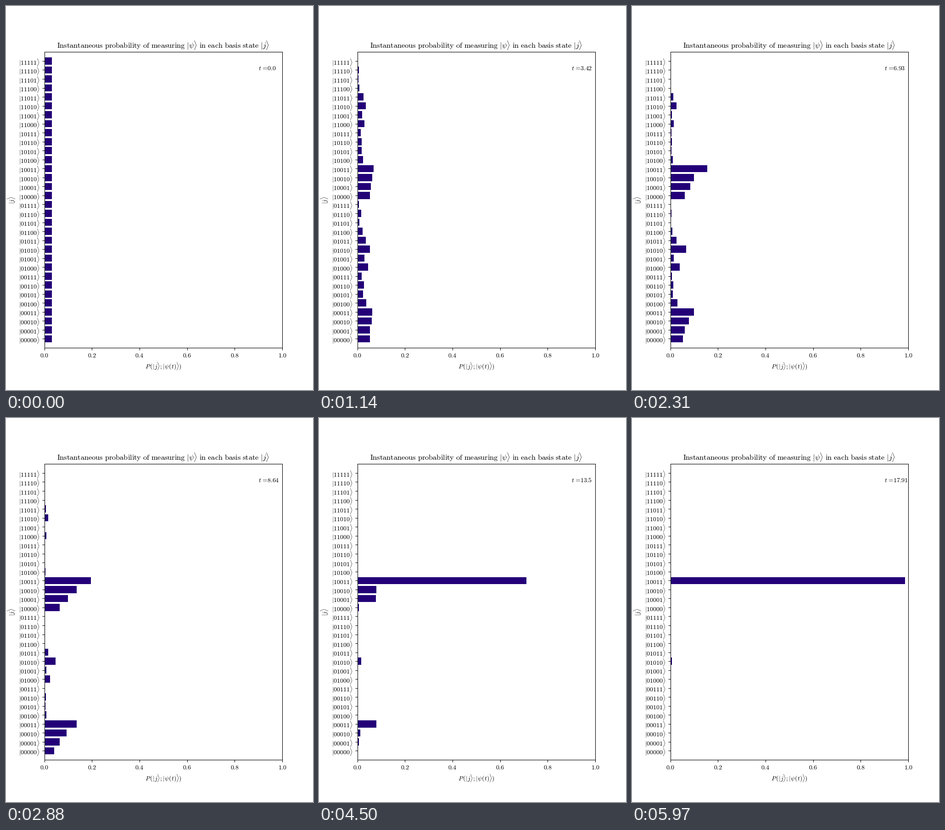
These frames come from a looping animation (669x837 px, 6 s). A matplotlib script:

```python
import numpy as np
import matplotlib.pyplot as plt
from matplotlib.animation import FuncAnimation

plt.rcParams["font.family"] = "DejaVu Serif"
plt.rcParams["mathtext.fontset"] = "cm"

# Adiabatic search for the maximum independent set of a small graph.
QUBITS = 5
STATES = 2 ** QUBITS
EDGES = [(0, 1), (0, 2), (1, 2), (1, 4), (2, 3), (2, 4)]
PENALTY = 4.0
TOTAL_TIME = 18.0
STEPS = 200
DT = TOTAL_TIME / STEPS

WIDTH, HEIGHT, DPI = 669, 837, 100
BAR_COLOR = "#240078"


def cost_energies():
    bits = (np.arange(STATES)[:, None] >> np.arange(QUBITS)[::-1]) & 1
    clashes = sum(bits[:, i] * bits[:, j] for i, j in EDGES)
    return PENALTY * clashes - bits.sum(axis=1)


def transverse_field():
    field = np.zeros((STATES, STATES))
    for k in range(QUBITS):
        for state in range(STATES):
            field[state, state ^ (1 << k)] = -1
    return field


def evolve():
    """Probabilities of all basis states at every time step."""
    mixer, cost = transverse_field(), np.diag(cost_energies())
    psi = np.full(STATES, STATES ** -0.5, dtype=complex)
    history = [np.abs(psi) ** 2]
    for step in range(1, STEPS):
        s = step / STEPS
        energy, vectors = np.linalg.eigh((1 - s) * mixer + s * cost)
        psi = vectors @ (np.exp(-1j * energy * DT) * (vectors.T @ psi))
        history.append(np.abs(psi) ** 2)
    return np.array(history)


def roman(text):
    return r"\mathrm{" + text.replace(" ", r"\ ") + "}"


def clock(step):
    return rf"$t\hspace{{0.08}}=\hspace{{-0.2}}{round(step * DT, 2)}$"


probs = evolve()

# The small surplus keeps the pixel size from truncating downwards.
fig = plt.figure(figsize=((WIDTH + 1e-3) / DPI, (HEIGHT + 1e-3) / DPI), dpi=DPI)
ax = fig.add_axes([0.125, 0.11, 0.775, 0.77])
bars = ax.barh(range(STATES), probs[0], height=0.8, color=BAR_COLOR)
ax.set_xlim(0, 1)
ax.set_ylim(-1, STATES)

ticks = np.linspace(0, 1, 6)
ax.set_xticks(ticks, [f"${x:.1f}$" for x in ticks])
ax.set_yticks(range(STATES), [rf"$|{n:05b}\rangle$" for n in range(STATES)])
ax.set_xlabel(r"$P\,(|j\rangle;|\psi(t)\rangle)$")
ax.set_ylabel(r"$|j\rangle$")
ax.set_title(
    "$" + roman("Instantaneous probability of measuring ") + r"|\psi\rangle"
    + roman(" in each basis state ") + r"|j\rangle$",
    fontsize=11.75,
)
label = ax.text(0.9, 30, clock(0))


def update(step):
    for bar, p in zip(bars, probs[step]):
        bar.set_width(p)
    label.set_text(clock(step))
    return [*bars, label]


anim = FuncAnimation(fig, update, frames=STEPS, interval=30, repeat=True)
plt.show()
```
